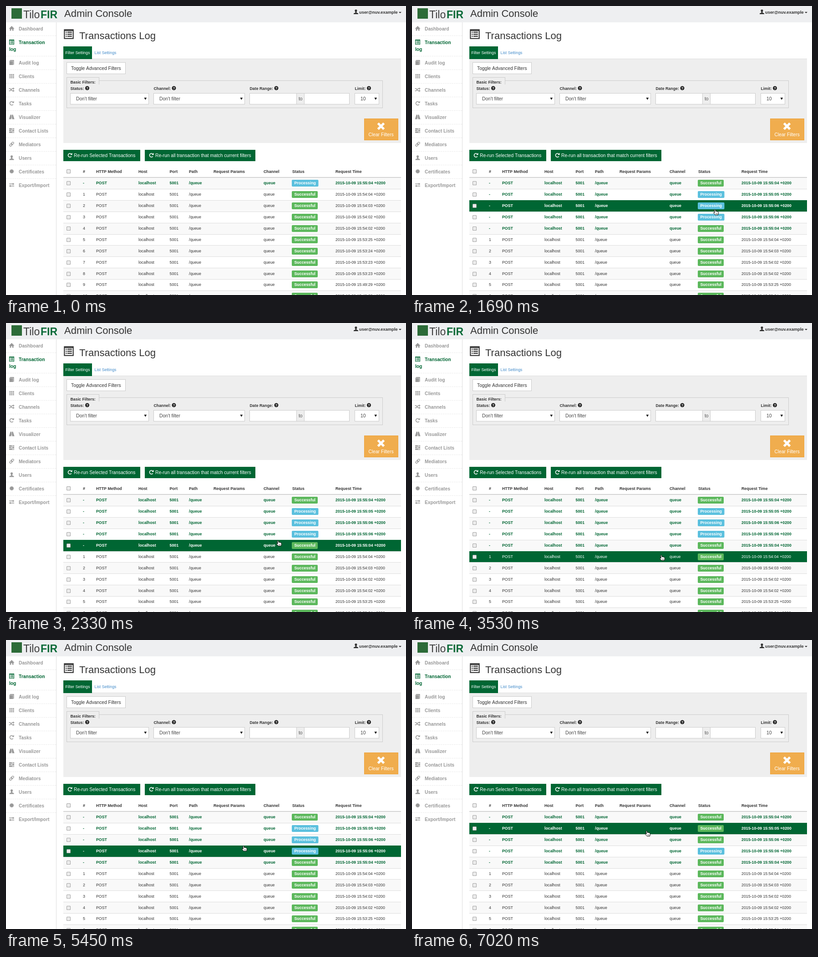
An HTML page with a canvas for the animation above (8000 ms loop, 879 by 637 pixels).

```html
<!DOCTYPE html>
<html lang="en">
<head>
<meta charset="utf-8">
<title>Admin Console</title>
<style>
html, body { margin: 0; width: 100%; height: 100%; overflow: hidden; background: #fff; }
canvas { display: block; width: 879px; height: 637px; }
</style>
</head>
<body>
<canvas id="stage" width="879" height="637"></canvas>
<script>
const ctx = document.getElementById('stage').getContext('2d');
const LOOP = 8000;
const GREEN = '#006633', GREY = '#999', DARK = '#333', LINE = '#ddd';
const SMALL = 8.8, BODY = 10.27, TITLE = 22;

function text(s, x, y, size, color = DARK, bold = false) {
  ctx.font = (bold ? 'bold ' : '') + size + 'px "Liberation Sans", Arial, sans-serif';
  ctx.fillStyle = color;
  ctx.fillText(s, x, y);
}

function rect(x, y, w, h, color) {
  ctx.fillStyle = color;
  ctx.fillRect(x, y, w, h);
}

function round(x, y, w, h, r, color) {
  ctx.fillStyle = color;
  ctx.beginPath();
  ctx.roundRect(x, y, w, h, r);
  ctx.fill();
}

function frame(x, y, w, h, fill, edge) {
  rect(x, y, w, h, edge);
  rect(x + 1, y + 1, w - 2, h - 2, fill);
}

function disc(x, y, r, color) {
  ctx.fillStyle = color;
  ctx.beginPath();
  ctx.arc(x, y, r, 0, Math.PI * 2);
  ctx.fill();
}

function shape(d, x, y, color) {
  ctx.save();
  ctx.translate(x, y);
  ctx.fillStyle = color;
  ctx.fill(new Path2D(d));
  ctx.restore();
}

function stroke(d, x, y, color, width) {
  ctx.save();
  ctx.translate(x, y);
  ctx.strokeStyle = color;
  ctx.lineWidth = width;
  ctx.stroke(new Path2D(d));
  ctx.restore();
}

// Icons are drawn around their centre
const icons = {
  home(x, y, c) {
    shape('M0-5.5L6 .5H4V5H1.2V1.5H-1.2V5H-4V.5H-6Z', x, y, c);
  },
  list(x, y, c, k = 1) {
    ctx.save();
    ctx.translate(x, y);
    ctx.scale(k, k);
    rect(-5.5, -5.5, 11, 11, c);
    rect(-4.4, -3.6, 8.8, 8, '#fff');
    for (let i = 0; i < 3; i++) {
      rect(-3.5, -2.8 + i * 2.3, 1.2, 1.2, c);
      rect(-1.6, -2.8 + i * 2.3, 5.1, 1.2, c);
    }
    ctx.restore();
  },
  book(x, y, c) {
    shape('M-5-3.5L-3-5.5H5V4L3.5 5.5H-5Z', x, y, c);
    stroke('M-4.5-3.3H3.2V5', x, y, '#ddd', .8);
  },
  grid(x, y, c) {
    for (let i = 0; i < 9; i++) rect(x - 5 + i % 3 * 3.7, y - 4.5 + Math.floor(i / 3) * 3.4, 2.7, 2.4, c);
  },
  shuffle(x, y, c) {
    stroke('M-6-2.5H-3.5L1 2.5H3.5M-6 2.5H-3.5L1-2.5H3.5', x, y, c, 1.5);
    shape('M3-5L6.2-2.5L3 0ZM3 0L6.2 2.5L3 5Z', x, y, c);
  },
  refresh(x, y, c) {
    stroke('M3.2 2.4A4 4 0 1 1 2.6-3', x, y, c, 1.6);
    shape('M5-5.2V-.8H.6Z', x, y, c);
  },
  road(x, y, c) {
    shape('M-2.8-5H-.6V-2.5H.6V-5H2.8L6 5H.8V2H-.8V5H-6Z', x, y, c);
    rect(x - .6, y - 1.2, 1.2, 2, '#fff');
  },
  tasks(x, y, c) {
    for (let i = 0; i < 3; i++) {
      rect(x - 5.5, y - 5 + i * 3.7, 11, 2.8, c);
      rect(x + [0, -2, 1][i], y - 4.1 + i * 3.7, 4, 1, '#fff');
    }
  },
  link(x, y, c) {
    ctx.save();
    ctx.translate(x, y);
    ctx.rotate(-Math.PI / 4);
    ctx.strokeStyle = c;
    ctx.lineWidth = 1.3;
    for (const dx of [-5.6, -.8]) {
      ctx.beginPath();
      ctx.roundRect(dx, -2, 6.4, 4, 2);
      ctx.stroke();
    }
    ctx.restore();
  },
  user(x, y, c) {
    shape('M0-5.2C3.4-5.2 2.8-1.4 1.3.2V1.4L5 3.2V5H-5V3.2L-1.3 1.4V.2C-2.8-1.4-3.4-5.2 0-5.2Z', x, y, c);
  },
  badge(x, y, c) {
    ctx.fillStyle = c;
    ctx.beginPath();
    for (let i = 0; i < 24; i++) {
      const a = i * Math.PI / 12, r = i % 2 ? 3.7 : 5.3;
      ctx.lineTo(x + r * Math.cos(a), y + r * Math.sin(a));
    }
    ctx.fill();
  },
  swap(x, y, c) {
    stroke('M-5.5-2.2H3M-3 2.2H5.5', x, y, c, 1.5);
    shape('M2.2-4.8L5.8-2.2L2.2.4ZM-2.2-.4L-5.8 2.2L-2.2 4.8Z', x, y, c);
  }
};

const menu = [
  ['home', 'Dashboard', 50], ['list', 'Transaction', 80], ['book', 'Audit log', 125],
  ['grid', 'Clients', 155], ['shuffle', 'Channels', 185], ['refresh', 'Tasks', 215],
  ['road', 'Visualizer', 245], ['tasks', 'Contact Lists', 275], ['link', 'Mediators', 305],
  ['user', 'Users', 335], ['badge', 'Certificates', 365], ['swap', 'Export/Import', 395]
];

function drawHeader() {
  rect(0, 0, 879, 36, '#eeeff1');
  rect(12, 5, 23, 23, '#2c6b38');
  text('Tilo', 38, 27, 23, '#3c3c3c');
  text('FIR', 76, 27, 23, '#0a6a38', true);
  text('Admin Console', 128, 24, TITLE);
  icons.user(769, 13, DARK);
  text('user@nuv.example', 776, 17, 9.35, DARK, true);
  shape('M0 0H6L3 3Z', 863, 13, DARK);
}

function drawMenu() {
  rect(110, 36, 1, 601, LINE);
  for (const [icon, label, y] of menu) {
    const active = icon === 'list', color = active ? GREEN : GREY;
    icons[icon](12.5, y - .5, color);
    text(label, 28, y + 4, BODY, color, true);
    if (active) text('log', 7, y + 19, BODY, color, true);
    const edge = y + (active ? 30 : 15);
    if (y < 395) for (let x = 0; x < 110; x += 4) rect(x, edge, 2, 1, '#e4e4e4');
  }
}

function select(x, w, label) {
  frame(x, 192, w, 25, '#fff', '#ccc');
  text(label, x + 13, 208, BODY, '#444');
  shape('M0 0H5.6L2.8 5Z', x + w - 10.5, 202, '#111');
}

function label(s, x, help) {
  text(s, x, 184.5, SMALL, DARK, true);
  disc(help, 181, 4.5, '#222');
  text('?', help - 2.2, 183.7, 7.5, '#fff', true);
}

function drawFilters() {
  icons.list(138, 62, DARK, 1.95);
  text('Transactions Log', 161, 73, TITLE);
  rect(126, 116, 742, 1, LINE);
  rect(126, 89, 63, 28, GREEN);
  text('Filter Settings', 130.5, 105.5, SMALL, '#fff');
  text('List Settings', 194.5, 105.5, SMALL, '#428bca');
  rect(126, 117, 742, 185, '#eee');
  frame(133, 124, 130, 26, '#fff', '#ccc');
  text('Toggle Advanced Filters', 143, 140.5, BODY);

  frame(133, 164, 695, 61, '#eee', '#ccc');
  frame(133, 157, 72, 18, '#eee', '#ccc');
  rect(134, 173, 71, 2, '#eee');
  text('Basic Filters:', 141.5, 171, SMALL, DARK, true);
  label('Status:', 141.5, 178.5);
  label('Channel:', 324.5, 369);
  label('Date Range:', 535.5, 594);
  label('Limit:', 766.5, 797.5);
  select(141, 173, "Don't filter");
  select(324, 201, "Don't filter");
  frame(535, 192, 220, 25, '#eee', '#ccc');
  frame(535, 192, 104, 25, '#fff', '#ccc');
  frame(655, 192, 100, 25, '#fff', '#ccc');
  text('to', 643, 208, BODY, '#555');
  select(766, 54, '10');

  frame(787, 248, 75, 48, '#f0ad4e', '#eea236');
  stroke('M-6.5-6.5L6.5 6.5M6.5-6.5L-6.5 6.5', 824, 265, '#fff', 5.2);
  text('Clear Filters', 796.5, 286.5, BODY, '#fff');

  rect(126, 317, 169, 25, GREEN);
  rect(305, 317, 243, 25, GREEN);
  icons.refresh(140.5, 329, '#fff');
  icons.refresh(319.5, 329, '#fff');
  text('Re-run Selected Transactions', 149, 333, BODY, '#fff');
  text('Re-run all transaction that match current filters', 328, 333, BODY, '#fff');
}

const columns = [169, 198, 291, 359.5, 402, 456, 566, 629, 724];
const heads = ['#', 'HTTP Method', 'Host', 'Port', 'Path', 'Request Params', 'Channel', 'Status', 'Request Time'];
const fresh = ['55:04', '55:05', '55:06', '55:06', '55:04'];
const past = ['54:04', '54:03', '54:02', '54:02', '53:25', '53:24', '53:23', '53:23', '49:29', '49:28'];
const rowTop = i => Math.round(378 + 24.9 * i);

function checkbox(y) {
  round(133, y - 4, 9, 9, 1.5, '#a5a5a5');
  round(134, y - 3, 7, 7, 1, '#ececec');
}

function drawRow(i, id, clock, busy, hover) {
  const top = rowTop(i), height = rowTop(i + 1) - top;
  const y = Math.round(390.3 + 24.9 * i), bold = id === '-';
  const color = hover ? '#fff' : bold ? GREEN : DARK;
  rect(126, top, 742, height, hover ? GREEN : i % 2 ? '#fff' : '#f9f9f9');
  if (!hover) rect(126, top, 742, 1, LINE);
  checkbox(y);
  const cells = [id, 'POST', 'localhost', '5001', '/queue', '', 'queue', '', '2015-10-09 15:' + clock + ' +0200'];
  cells.forEach((s, k) => text(s, columns[k], y + 3, SMALL, color, bold));
  round(628, y - 7, busy ? 58.5 : 57, 15, 2, busy ? '#5bc0de' : '#5cb85c');
  text(busy ? 'Processing' : 'Successful', 633.5, y + 3, SMALL, '#fff', true);
}

function drawTable(t, hotY) {
  checkbox(364);
  heads.forEach((s, k) => text(s, columns[k], 367.5, SMALL, DARK, true));
  const added = t < 1170 ? 1 : 5;
  const busy = t < 1170 ? [0] : t < 5820 ? [1, 2, 3] : [3];
  for (let i = 0; i < 11; i++) {
    const old = i - added;
    const hover = hotY >= rowTop(i) && hotY < rowTop(i + 1);
    drawRow(i, old < 0 ? '-' : String(old + 1), old < 0 ? fresh[i] : past[old], busy.includes(i), hover);
  }
  rect(126, 377, 742, 1, '#ccc');
}

// Pointer path: time, x, y
const path = [
  [1210, 660, 630], [1400, 668, 388], [1610, 668, 388], [1790, 655, 522],
  [1940, 636, 486], [2330, 594, 479], [2380, 592, 480], [2420, 592, 480],
  [2920, 551, 522], [3060, 551, 522], [3180, 549, 518], [3370, 549, 518],
  [3530, 544, 511], [4060, 534, 498], [4360, 534, 498], [5080, 518, 462],
  [5170, 518, 462], [5450, 518, 453], [5570, 518, 451], [6400, 518, 451],
  [7020, 512, 420]
];

function pointerAt(t) {
  if (t < path[0][0]) return null;
  const n = path.findIndex(p => p[0] > t);
  if (n < 0) return path[path.length - 1].slice(1);
  const a = path[n - 1], b = path[n], k = (t - a[0]) / (b[0] - a[0]);
  return [1, 2].map(j => Math.round(a[j] + (b[j] - a[j]) * k));
}

function drawHand([x, y]) {
  const hand = 'M2.5 1.2Q3.5 0 4.6 1.2L5.2 4.6L6.6 4.3L8.2 4.8L9.8 5L11.2 6.2L11.4 9.2L10.6 12.4H4.4L.8 8.4Q.4 7 1.6 6.9L3.2 7.8Z';
  shape(hand, x, y, '#fff');
  stroke(hand, x, y, '#000', 1);
  stroke('M5.8 8.6V10.8M7.4 8.6V10.8M9 8.6V10.8', x, y, '#000', .6);
}

function draw() {
  const t = performance.now() % LOOP;
  const pointer = pointerAt(t);
  rect(0, 0, 879, 637, '#fff');
  drawHeader();
  drawMenu();
  drawFilters();
  drawTable(t, pointer ? pointer[1] + 3 : -1);
  if (pointer) drawHand(pointer);
  requestAnimationFrame(draw);
}
draw();
</script>
</body>
</html>
```
